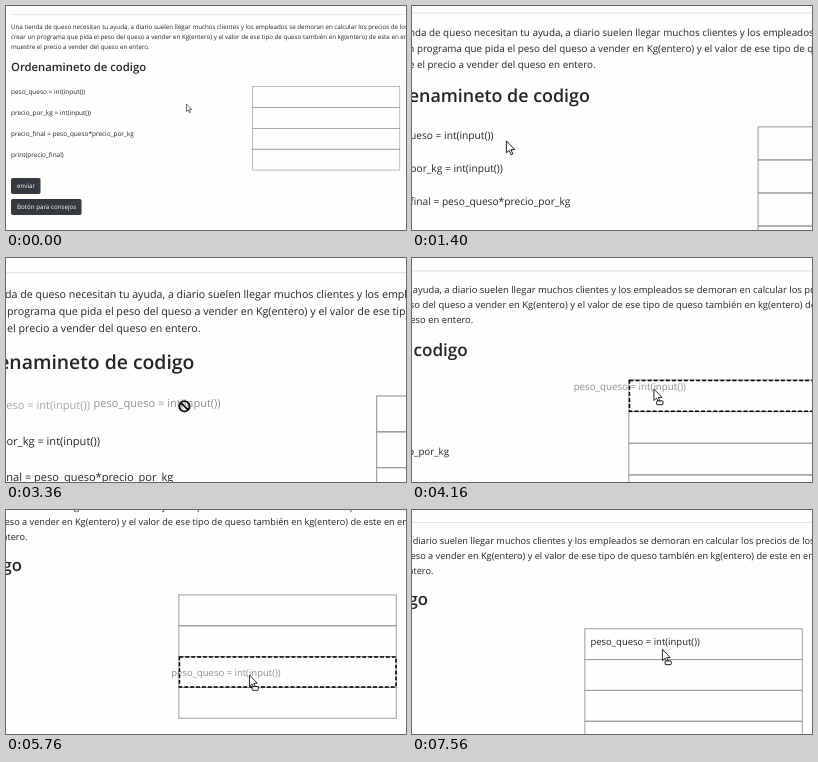
An HTML page for the animation above (7600 ms loop, 400 by 224 pixels).

```html
<!DOCTYPE html>
<html lang="es">
<head>
<meta charset="utf-8">
<title>Ordenamineto de codigo</title>
<style>
html, body { margin: 0; height: 100%; overflow: hidden; background: #fefefd; }
svg { display: block; width: 100vw; height: 100vh; }
text { font-family: "Open Sans", "Noto Sans", sans-serif; font-size: 6.22px; fill: #212529; text-rendering: geometricPrecision; }
.code { font-size: 6.45px; }
.title { font-size: 11.3px; font-weight: 600; }
.button rect { fill: #343a40; }
.button text { fill: #fff; }
.slot { fill: none; stroke: #999; stroke-width: .65; }
#target { fill: none; stroke: #000; stroke-width: 1; stroke-dasharray: 2.6 1.4; }
</style>
</head>
<body>
<svg viewBox="0 0 400 224">
  <g id="page">
    <path d="M5 8.5H400" stroke="#e3e3e3" stroke-width=".7"/>
    <text x="5" y="23.1">Una tienda de queso necesitan tu ayuda, a diario suelen llegar muchos clientes y los empleados se demoran en calcular los precios de los quesos,</text>
    <text x="5" y="33.1">crear un programa que pida el peso del queso a vender en Kg(entero) y el valor de ese tipo de queso también en kg(entero) de este en entero,</text>
    <text x="5" y="43.2">muestre el precio a vender del queso en entero.</text>
    <text class="title" x="5" y="64.6">Ordenamineto de codigo</text>
    <g id="lines"></g>
    <g class="button"><rect x="5" y="172" width="29.5" height="16" rx="1.7"/><text x="11" y="182.3">enviar</text></g>
    <g class="button"><rect x="5" y="193" width="70.5" height="16" rx="1.7"/><text x="11" y="203.3">Botón para consejos</text></g>
    <g id="slots"></g>
    <rect id="target" x="246.8" width="146.8" height="20.3"/>
    <text class="code" id="moved">peso_queso = int(input())</text>
    <g id="pointer">
      <g id="arrow" transform="scale(.46)" stroke="#000" stroke-linejoin="round">
        <path d="M0 0V16.5L3.8 13L6.3 19L8.8 18L6.3 12H11.5Z" fill="#fff" stroke-width="1.2"/>
        <rect id="load" x="4" y="17" width="9" height="5.5" rx="1" fill="#fff" stroke-width="1.3"/>
      </g>
      <path id="denied" d="M-3 0A3 3 0 1 0 3 0A3 3 0 1 0 -3 0M-2.1 -2.1L2.1 2.1" fill="none" stroke="#111" stroke-width="1.15"/>
    </g>
  </g>
</svg>
<script>
const LOOP = 7600, GRAB = 2700, DROP = 7350;
const TOP = 80.5, ROW = 20.9, LEFT = 246.4;

const $ = id => document.getElementById(id);
const show = (id, on) => $(id).style.display = on ? "" : "none";
const place = (id, x, y) => { $(id).setAttribute("x", x); $(id).setAttribute("y", y); };

// smooth step from 0 to 1 between two times
const ease = (t, from, to) => {
  const u = Math.max(0, Math.min(1, (t - from) / (to - from)));
  return u * u * (3 - 2 * u);
};

// zoom in on the code, follow the drag to the slots, scroll down and back
function camera(t) {
  const zoom = 1 + .785 * ease(t, 0, 2100) - .31 * ease(t, 2827, 4547);
  const centre = 200 - 87 * ease(t, 475, 2260) + 151.8 * ease(t, 2768, 4710);
  const top = 5.2 * (ease(t, 200, 1000) - ease(t, 1150, 2000))
    + 32.5 * (ease(t, 4800, 6300) - ease(t, 6700, 7560));
  return `translate(${200 - centre * zoom} ${-top * zoom}) scale(${zoom})`;
}

// pointer on the page: to the first line, over to the slots, down and back up
const mouse = t => [
  180.5 - 124.5 * ease(t, 0, 2083) + 236 * ease(t, 2580, 4605) + 7 * ease(t, 4700, 7500),
  98 - 11.5 * ease(t, 0, 2083) + 60 * ease(t, 4900, 6100) - 52 * ease(t, 6400, 7200)
];

function draw(t) {
  const [x, y] = mouse(t);
  const dropped = t >= DROP, held = t >= GRAB && !dropped, over = x > LEFT;
  $("page").setAttribute("transform", camera(t));
  $("pointer").setAttribute("transform", `translate(${x} ${y})`);

  show("line0", !dropped);
  $("line0").style.opacity = held ? .4 : 1;
  show("moved", held || dropped);
  $("moved").style.opacity = held ? .5 : 1;
  if (dropped) place("moved", 250.2, 91.7);
  else place("moved", x - 53, y + .4);

  const row = Math.max(0, Math.min(3, Math.floor((y - TOP) / ROW)));
  show("target", held && over);
  $("target").setAttribute("y", TOP + row * ROW + .3);
  show("denied", held && !over);
  show("arrow", !held || over);
  show("load", t >= GRAB);
}

const lines = ["peso_queso = int(input())", "precio_por_kg = int(input())",
  "precio_final = peso_queso*precio_por_kg", "print(precio_final)"];
$("lines").innerHTML = lines.map((line, i) =>
  `<text class="code" id="line${i}" x="5" y="${87.9 + i * 21}">${line}</text>`).join("");
$("slots").innerHTML = lines.map((_, i) =>
  `<rect class="slot" x="${LEFT}" y="${TOP + i * ROW}" width="147.4" height="${ROW}"/>`).join("");

const start = performance.now();
function tick() {
  draw((performance.now() - start) % LOOP);
  requestAnimationFrame(tick);
}
tick();
</script>
</body>
</html>
```
